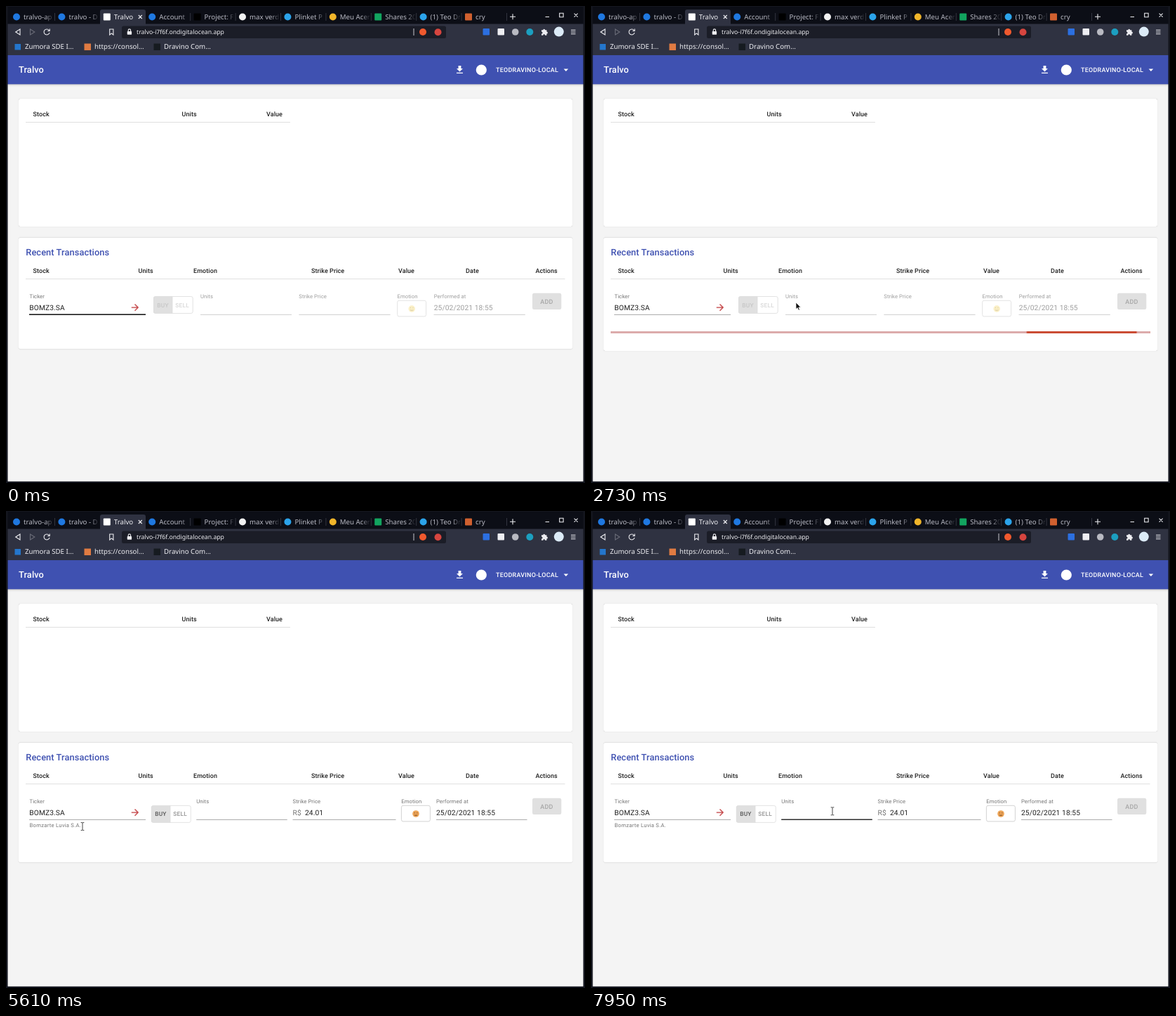
Write an HTML page that moves like this. It is 825 px wide and 679 px high and loops after 8000 ms.

```html
<!DOCTYPE html>
<html lang="en">
<head>
<meta charset="utf-8">
<title>Tralvo</title>
<style>
html, body { margin: 0; width: 100%; height: 100%; overflow: hidden; background: #f4f4f4; }
#stage { display: block; width: 100%; height: 100%; font-family: Roboto, sans-serif; text-rendering: geometricPrecision; }
.ui { font: 9.7px "Noto Sans", sans-serif; fill: #eeeef2; }
.url { font-size: 8.7px; }
.tab { fill: #b9bac4; }
.h6 { font-size: 12.8px; font-weight: 500; letter-spacing: .0075em; }
.cell { font-size: 8.96px; font-weight: 500; letter-spacing: .01071em; fill: #212121; }
.val { font-size: 10.24px; letter-spacing: .00938em; fill: #212121; }
.lab { font-size: 7.68px; letter-spacing: .00938em; fill: #757575; }
.help { letter-spacing: .03333em; }
.btn { font-size: 8.96px; font-weight: 500; letter-spacing: .02857em; }
.tog { font-size: 8.32px; }
.off { fill: #9e9e9e; }
.card { fill: #fff; filter: drop-shadow(0 .8px .4px rgba(0,0,0,.32)) drop-shadow(0 .6px .8px rgba(0,0,0,.06)); }
.bar { fill: #3f51b1; filter: drop-shadow(0 .8px .6px rgba(0,0,0,.22)) drop-shadow(0 1.8px 1.6px rgba(0,0,0,.18)); }
.rule { stroke: #e0e0e0; }
.under { stroke: #949494; stroke-width: .8; }
.dim { stroke: #c4c4c4; }
.hot { stroke: #212121; stroke-width: 1.5; }
.box { fill: none; stroke: #dcdcdc; stroke-width: .8; }
.line { fill: none; stroke: #eeeef2; stroke-width: 1.1; }

.anim { animation: 8s linear infinite; }
#card { animation-name: card; animation-timing-function: step-end; }
#before { animation-name: before; animation-timing-function: step-end; }
#after { animation-name: after; animation-timing-function: step-end; }
#load { animation-name: load; animation-timing-function: step-end; }
#bar1 { animation-name: bar1; }
#bar2 { animation-name: bar2; }
#focus { animation-name: blur; transform-box: fill-box; transform-origin: center; }
#ripple { animation-name: ripple; transform-box: fill-box; transform-origin: center; }
#unitsHot { animation-name: unitsHot; }
#strikeHot { animation-name: strikeHot; }
#sel { animation-name: sel; }
#pointer { animation-name: move; }
#beam { animation-name: beam; animation-timing-function: step-end; }
#hand { animation-name: hand; animation-timing-function: step-end; }
#arrow { animation-name: arrow; animation-timing-function: step-end; }

@keyframes card { 0% { height: 159px } 13.375% { height: 161.5px } 51.6%, 100% { height: 171px } }
@keyframes before { 0% { opacity: 1 } 51.6%, 100% { opacity: 0 } }
@keyframes after { 0% { opacity: 0 } 51.6%, 100% { opacity: 1 } }
@keyframes load { 0% { opacity: 0 } 13.375% { opacity: 1 } 51.6%, 100% { opacity: 0 } }
@keyframes bar1 {
  0% { x: -35%; width: 35%; animation-timing-function: step-end }
  13.61%, 38.08% { x: -35%; width: 35%; animation-timing-function: cubic-bezier(.65,.815,.735,.395) }
  28.39%, 52.23% { x: 100%; width: 90%; animation-timing-function: step-end }
  100% { x: 100%; width: 90% }
}
@keyframes bar2 {
  0% { x: -200%; width: 200%; animation-timing-function: step-end }
  27.1%, 50.99% { x: -200%; width: 200%; animation-timing-function: cubic-bezier(.165,.84,.44,1) }
  41.88%, 65.15% { x: 107%; width: 1%; animation-timing-function: step-end }
  100% { x: 107%; width: 1% }
}
@keyframes blur {
  0% { transform: none } 20.6% { transform: none; animation-timing-function: ease-out }
  23%, 100% { transform: scaleX(0) }
}
@keyframes ripple {
  0%, 13.3% { opacity: 0; transform: scale(.4) } 13.4% { opacity: 1; transform: scale(.4); animation-timing-function: ease-out }
  17%, 21.3% { opacity: 1; transform: none } 22.9%, 100% { opacity: 0; transform: none }
}
@keyframes unitsHot { 0%, 51.7% { opacity: 0 } 54%, 66.3% { opacity: 1 } 68%, 97.5% { opacity: 0 } 99.3%, 100% { opacity: .9 } }
@keyframes strikeHot { 0%, 92% { opacity: 0 } 94%, 97.2% { opacity: 1 } 98.8%, 100% { opacity: 0 } }
@keyframes sel {
  0%, 71% { clip-path: inset(0 0 0 100%) } 75.4% { clip-path: inset(0) }
  81.4% { clip-path: inset(0); animation-timing-function: step-start } 81.5%, 100% { clip-path: inset(0 0 0 100%) }
}
@keyframes move {
  0%, 7.1% { transform: translate(170px,431px) }
  10.75%, 20.4% { transform: translate(184.5px,426px); animation-timing-function: ease-in-out }
  23% { transform: translate(206px,425px) }
  33.5%, 46% { transform: translate(292px,422px) }
  48.5%, 51.6% { transform: translate(293px,421.5px) }
  55.5% { transform: translate(295.5px,423px) }
  59%, 65.75% { transform: translate(299px,424.2px); animation-timing-function: ease-in-out }
  70%, 71% { transform: translate(109px,449px) }
  75.5%, 78.7% { transform: translate(33px,453px) }
  80%, 81.2% { transform: translate(23px,455px) }
  82.3% { transform: translate(220px,457px) }
  84% { transform: translate(570px,412px) }
  85.9%, 87.25% { transform: translate(689px,459px) }
  91% { transform: translate(580px,412px) }
  93% { transform: translate(510px,428px) }
  96.9% { transform: translate(420px,428px) }
  99.2%, 100% { transform: translate(344px,427.3px) }
}
@keyframes beam {
  0% { opacity: 0 } 7% { opacity: 1 } 9.5% { opacity: 0 } 51.7% { opacity: 1 } 66.6% { opacity: 0 }
  69.5% { opacity: 1 } 75.3% { opacity: 0 } 92.3%, 100% { opacity: 1 }
}
@keyframes hand { 0% { opacity: 0 } 9.5% { opacity: 1 } 21.6%, 100% { opacity: 0 } }
@keyframes arrow {
  0% { opacity: 0 } 21.6% { opacity: 1 } 51.7% { opacity: 0 } 66.6% { opacity: 1 } 69.5% { opacity: 0 }
  75.3% { opacity: 1 } 92.3%, 100% { opacity: 0 }
}
</style>
</head>
<body>
<svg id="stage" viewBox="0 0 825 679" preserveAspectRatio="none">
  <defs>
    <linearGradient id="fade"><stop stop-color="#0c0e16" stop-opacity="0"/><stop offset="1" stop-color="#0c0e16"/></linearGradient>
  </defs>
  <rect width="825" height="679" fill="#f4f4f4"/>

  <!-- cards -->
  <rect class="card" x="18" y="132" width="789" height="182" rx="2.5"/>
  <rect class="card anim" id="card" x="18" y="329.5" width="789" height="159" rx="2.5"/>

  <!-- app bar -->
  <rect class="bar" x="2" y="70" width="821" height="41.3"/>
  <text class="h6" x="18" y="95.3" fill="#fff">Tralvo</text>
  <path transform="translate(638.8 83.2) scale(.64)" fill="#fff" d="M19 9h-4V3H9v6H5l7 7 7-7zM5 18v2h14v-2H5z"/>
  <circle cx="677.3" cy="91" r="7.6" fill="#fff"/>
  <text class="btn" x="698" y="94.1" fill="#fff">TEODRAVINO-LOCAL</text>
  <path d="M794.6 89.6h6.6l-3.3 3.3z" fill="#fff"/>

  <!-- browser frame -->
  <rect width="825" height="27" fill="#0c0e16"/>
  <rect x="2" y="25.5" width="821" height="44.5" fill="#2f3241"/>
  <path d="M134 26V8q0-3 3-3h59q3 0 3 3v18z" fill="#2f3241"/>
  <g id="tabs"></g>
  <path class="line" d="M188.8 13l5 5m0-5l-5 5M718 15.3h8m-4-4v8M768.5 15.5h5.5M788.7 10.3h5.4v5.4h-5.4zM809.6 10.6l5 5m0-5l-5 5"/>
  <path class="line" d="M20 33l-6.3 4 6.3 4z"/>
  <path class="line" d="M34.5 33l6.3 4-6.3 4z" stroke-opacity=".3"/>
  <path class="line" d="M61.3 34.6a4 4 0 1 0 .7 3.3M62.2 32.6v2.9h-2.9"/>
  <path class="line" d="M147.7 33h5.2v8l-2.6-2.1-2.6 2.1z"/>
  <rect x="165" y="28.5" width="462" height="17.5" rx="2.5" fill="#1b1d27"/>
  <rect x="172.7" y="36" width="6.4" height="4.8" rx=".7" fill="#eeeef2"/>
  <path class="line" d="M174.2 36v-1.4a1.7 1.7 0 0 1 3.4 0V36"/>
  <text class="ui url" x="186" y="40">tralvo-i7f6f.ondigitalocean.app</text>
  <path d="M581 32v10" stroke="#c8c8ce"/>
  <circle cx="594" cy="37" r="5" fill="#f0592e"/>
  <circle cx="615.5" cy="37.3" r="5" fill="#d6453f"/>
  <rect x="679.5" y="32" width="9.5" height="9.5" rx="1" fill="#2c6fe0"/>
  <rect x="700.5" y="32" width="9.5" height="9.5" rx="1" fill="#eeeef2"/>
  <circle cx="725.7" cy="37" r="4.8" fill="#b9bac2"/>
  <circle cx="746.3" cy="37" r="5" fill="#1c9fc0"/>
  <path d="M763 34.2h2.2a1.5 1.5 0 0 1 3 0h2.2v2.2a1.5 1.5 0 0 1 0 3v2.3h-2.3a1.4 1.4 0 0 0-2.8 0H763v-2.3a1.5 1.5 0 0 0 0-3z" fill="#eeeef2"/>
  <circle cx="787.8" cy="36.6" r="7" fill="#dcebf7"/>
  <path class="line" d="M805 34.2h6.5m-6.5 2.8h6.5m-6.5 2.8h6.5"/>
  <rect x="12.5" y="54" width="8.5" height="8.5" fill="#2476cc"/>
  <rect x="111.5" y="53.5" width="9.5" height="9.5" fill="#e07b42"/>
  <rect x="210.5" y="53.5" width="9.5" height="9.5" fill="#161b20"/>
  <g class="ui">
    <text x="27" y="61.4">Zumora SDE I…</text>
    <text x="126" y="61.4">https://consol…</text>
    <text x="225" y="61.4">Dravino Com…</text>
  </g>
  <path d="M0 0h825v679H0zM2.5 1v675.8h820V1z" fill="#14161e" fill-rule="evenodd"/>

  <!-- tables -->
  <g class="cell">
    <text x="38.5" y="157.2">Stock</text><text x="250.5" y="157.2">Units</text><text x="371" y="157.2">Value</text>
    <text x="38.5" y="379.8">Stock</text><text x="188.5" y="379.8">Units</text><text x="267" y="379.8">Emotion</text>
    <text x="435" y="379.8">Strike Price</text><text x="559" y="379.8">Value</text><text x="655" y="379.8">Date</text>
    <text x="754.5" y="379.8">Actions</text>
  </g>
  <path class="rule" d="M28 165.5h377M28 388.5h768.5"/>
  <text class="h6" x="28.3" y="354.6" fill="#3f51b1">Recent Transactions</text>

  <!-- ticker and add -->
  <text class="lab" x="33.5" y="415.9">Ticker</text>
  <text class="val" x="33.3" y="432.8">BOMZ3.SA</text>
  <path class="under" d="M33 439.4h166"/>
  <rect class="anim" id="focus" x="33" y="438.4" width="166" height="1.6" fill="#1c1c1c"/>
  <circle class="anim" id="ripple" cx="184" cy="429" r="15" fill="#f50057" fill-opacity=".06"/>
  <path transform="translate(176.2 421.5) scale(.64)" fill="#c0393b" d="M12 4l-1.41 1.41L16.17 11H4v2h12.17l-5.58 5.59L12 20l8-8z"/>
  <rect x="750" y="408.8" width="41.3" height="23.2" rx="2.5" fill="#e0e0e0"/>
  <text class="btn" x="761.2" y="423.5" fill="#a6a6a6">ADD</text>

  <!-- form while disabled -->
  <g class="anim" id="before">
    <path d="M210 416q0-2.5 2.5-2.5H237v24h-24.5q-2.5 0-2.5-2.5z" fill="#e0e0e0"/>
    <rect class="box" x="210.4" y="413.5" width="55.8" height="24" rx="2.5"/>
    <path class="box" d="M237 413.5v24"/>
    <g class="btn tog" fill="#c6c6c6"><text x="215.3" y="428.5">BUY</text><text x="241.3" y="428.5" fill="#d8d8d8">SELL</text></g>
    <g class="lab off">
      <text x="277" y="415.9">Units</text><text x="417.3" y="415.9">Strike Price</text>
      <text x="557.5" y="415.9">Emotion</text><text x="609.7" y="415.9">Performed at</text>
    </g>
    <path class="under dim" d="M277 439.4h130M417.3 439.4h130.3M609.5 439.4h130.3"/>
    <rect class="box" x="557.6" y="419.3" width="41" height="22.6" rx="2.5"/>
    <g opacity=".5"><circle cx="578.2" cy="431" r="4.7" fill="#f5df8c"/><path d="M576 429.6h1m2.4 0h1M576 432.7q2.2 1.5 4.4 0" fill="none" stroke="#a88b45" stroke-width=".9"/></g>
    <text class="val off" x="609.7" y="432.8">25/02/2021 18:55</text>
  </g>

  <!-- form once filled -->
  <g class="anim" id="after">
    <path d="M207 422q0-2.5 2.5-2.5H234v24h-24.5q-2.5 0-2.5-2.5z" fill="#e0e0e0"/>
    <rect class="box" x="207.3" y="419.4" width="56" height="24" rx="2.5"/>
    <path class="box" d="M234 419.5v24"/>
    <g class="btn tog"><text x="212.2" y="434.4" fill="#555">BUY</text><text x="238.3" y="434.4" fill="#949494">SELL</text></g>
    <text class="lab help" x="33.5" y="450.2">Bomzarte Luvia S.A.</text>
    <g class="lab">
      <text x="271.3" y="415.9">Units</text><text x="408.6" y="415.9">Strike Price</text>
      <text x="563.3" y="415.9">Emotion</text><text x="613" y="415.9">Performed at</text>
    </g>
    <path class="under" d="M271.2 439.4h129.5M408.5 439.4h147M613 439.4h129.5"/>
    <path class="hot anim" id="unitsHot" d="M271.2 439.2h129.5"/>
    <path class="hot anim" id="strikeHot" d="M408.5 439.2h147"/>
    <rect class="box" x="563.4" y="419.3" width="41" height="22.6" rx="2.5" style="stroke:#c8c8c8"/>
    <circle cx="584" cy="431" r="4.8" fill="#eda456"/>
    <path d="M581.8 429.8h1.2m2.1 0h1.2M581.9 432.9q2.1.8 4.2 0" fill="none" stroke="#6b3f1d" stroke-width=".9"/>
    <text class="val" x="408.6" y="432.8" style="fill:#757575">R$</text>
    <text class="val" x="426" y="432.8">24.01</text>
    <text class="val" x="613" y="432.8">25/02/2021 18:55</text>
    <g class="anim" id="sel">
      <rect x="33.3" y="441.5" width="74.5" height="12.5" fill="#3b9ad6"/>
      <circle cx="32" cy="454" r="2.5" fill="#8ac4e8"/>
      <text class="lab help" x="33.5" y="450.2" style="fill:#fff">Bomzarte Luvia S.A.</text>
    </g>
  </g>

  <!-- progress -->
  <g class="anim" id="load">
    <svg x="28.3" y="463" width="768.7" height="2.6" overflow="hidden">
      <rect width="100%" height="3" fill="#dcabab"/>
      <rect class="anim" id="bar1" height="3" fill="#cb4c34"/>
      <rect class="anim" id="bar2" height="3" fill="#cb4c34"/>
    </svg>
  </g>

  <!-- mouse -->
  <g class="anim" id="pointer">
    <path class="anim" id="beam" d="M-2.3-5.5h1.5l.8.6.8-.6h1.5M0-4.9v9.8M-2.3 5.5h1.5l.8-.6.8.6h1.5" fill="none" stroke="#333" stroke-width=".9"/>
    <path class="anim" id="hand" d="M-1 0q1.1-.9 1.8.4v3.7l5 .8q1.4.4 1.3 1.9l-.7 4.1H-.2L-3 6.7q-.4-1.5 1.1-1.1l.7.7z" fill="#fff" stroke="#111"/>
    <path class="anim" id="arrow" d="M0 0v9.6l2.2-2 1.5 3.5 1.7-.7-1.5-3.4h3z" fill="#111" stroke="#fff" stroke-width=".7"/>
  </g>
</svg>
<script>
const tabs = [
  ["dot", "#1f78e0", "tralvo-ap"], ["dot", "#1f78e0", "tralvo - D"], ["box", "#fff", "Tralvo"],
  ["dot", "#1f78e0", "Account"], ["box", "#000", "Project: F"], ["dot", "#f2f2f2", "max verdo"],
  ["dot", "#2ba3ea", "Plinket P"], ["dot", "#f0b52a", "Meu Acervo"], ["box", "#12a45f", "Shares 20"],
  ["dot", "#2ba3ea", "(1) Teo Dr"], ["box", "#d0602f", "cry"]
];
const icon = {
  dot: (x, c) => `<circle cx="${x}" cy="15.5" r="5" fill="${c}"/>`,
  box: (x, c) => `<rect x="${x - 5}" y="10.5" width="10" height="10" rx="1" fill="${c}"/>`
};
document.getElementById("tabs").innerHTML = tabs.map(([shape, color, label], i) => {
  const x = 15 + i * 64.4, active = i === 2;
  const fade = active ? "" : `<rect x="31" width="12" height="25" fill="url(#fade)"/>`;
  const edge = active || i === 1 ? "" : `<path d="M${x + 54.5} 10v11" stroke="#33353f"/>`;
  return icon[shape](x, color) + edge +
    `<svg x="${x + 10}" width="42" height="25"><text class="ui ${active ? "" : "tab"}" y="18.8">${label}</text>${fade}</svg>`;
}).join("");
</script>
</body>
</html>
```
